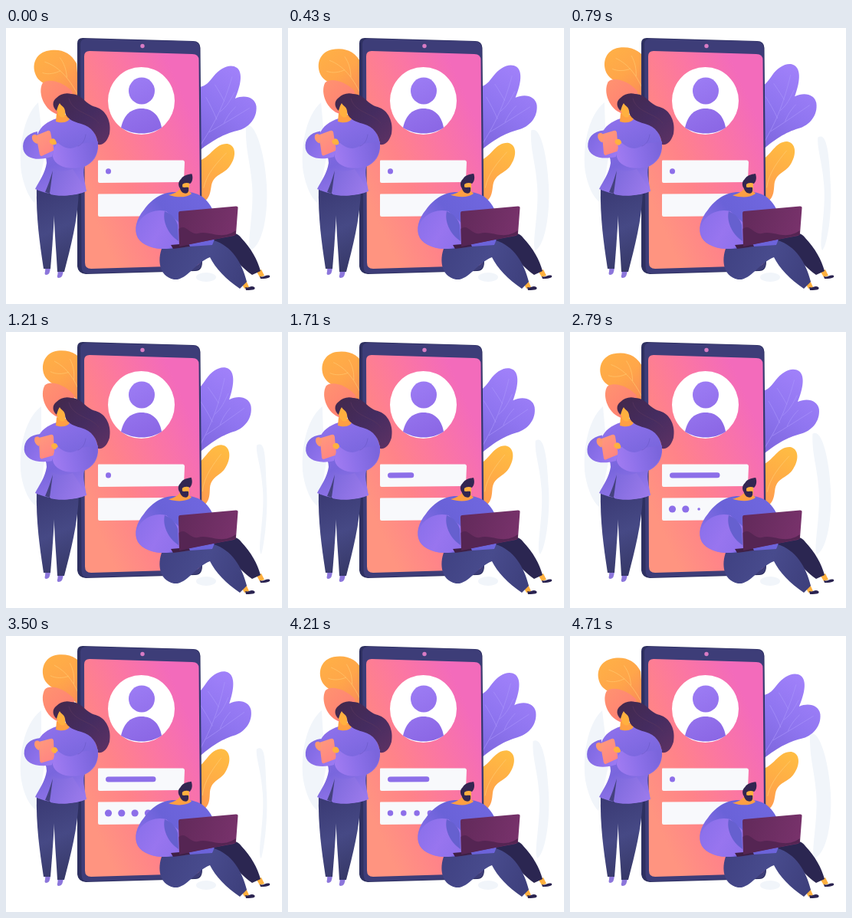
Write an HTML page with a canvas that moves like this. It is 360 by 360 pixels and loops after 4780 ms.

```html
<!DOCTYPE html>
<html lang="en">
<head>
<meta charset="utf-8">
<title>Sign in</title>
<style>
html, body { margin: 0; width: 100%; height: 100%; overflow: hidden; background: #fff; }
canvas { display: block; width: 100vmin; height: 100vmin; }
</style>
</head>
<body>
<canvas id="stage" width="360" height="360"></canvas>
<script>
const ctx = document.getElementById('stage').getContext('2d');
const LOOP = 4780, STEPS = 67, STEP = LOOP / STEPS;
const NAVY = '#3d3d78', HAIR = '#452c60', SKIN = '#ffb03f', VIOLET = '#8d6fe9';

function linear(x0, y0, x1, y1, ...colors) {
  const g = ctx.createLinearGradient(x0, y0, x1, y1);
  colors.forEach((c, i) => g.addColorStop(i / (colors.length - 1), c));
  return g;
}

function shape(d, fill) {
  ctx.fillStyle = fill;
  ctx.fill(new Path2D(d));
}

function line(d, color, width = 0.8) {
  ctx.strokeStyle = color;
  ctx.lineWidth = width;
  ctx.lineCap = 'round';
  ctx.stroke(new Path2D(d));
}

function oval(x, y, rx, ry, fill) {
  ctx.fillStyle = fill;
  ctx.beginPath();
  ctx.ellipse(x, y, rx, ry, 0, 0, Math.PI * 2);
  ctx.fill();
}

function turned(x, y, angle, draw) {
  ctx.save();
  ctx.translate(x, y);
  ctx.rotate(angle);
  ctx.translate(-x, -y);
  draw();
  ctx.restore();
}

// Eased progress from 0 to 1 between two times
function ease(t, from, to) {
  const p = Math.min(1, Math.max(0, (t - from) / (to - from)));
  return p * p * (3 - 2 * p);
}

function backdrop(sway) {
  const pale = '#f1f5fa', r = 323 - 7 * sway, l = 38 - 2 * sway;
  const top = 138 - 10 * sway;
  shape(`M${r - 3} ${top} C${r + 9} ${top - 8} 338 165 340 205 C342 240 336 282 ${r + 3} 290
    C${r - 3} 284 ${r + 8} 240 ${r + 5} 205 C${r + 3} 175 ${r - 4} 160 ${r - 3} ${top}Z`, pale);
  shape(`M${l + 6} 97 C22 115 16 160 20 188 C23 205 30 222 ${l + 1} 228 L50 170 L46 130Z`, pale);
  oval(261, 325, 13, 6, pale);
}

function leaves(sway) {
  turned(98, 125, -0.075 * sway, () => {
    shape('M98 94 L98 46 C91 30 77 24 60 27 C45 30 38 45 45 60 C52 73 72 74 98 94Z',
      linear(48, 28, 92, 90, '#ffb046', '#ffa64a', '#fb8c58'));
    line('M96 86 C86 63 74 48 57 41 M84 63 C84 53 82 45 77 37 M76 54 C69 57 60 58 53 55', '#ffc76d', 0.7);
  });
  turned(90, 118, -0.035 * sway, () =>
    shape('M92 105 L87 82 C74 68 55 64 49 71 C42 84 51 107 68 112Z',
      linear(48, 70, 82, 106, '#ff9270', '#ff7f74')));
  turned(245, 195, 0.037 * sway, () => {
    shape(`M246 164 L248 77 C257 75 260 70 266 62 C274 51 287 44 296 50 C304 56 302 72 295 90
      C308 84 321 88 323 99 C325 115 314 128 299 132 C282 137 268 145 246 164Z`,
      linear(252, 155, 310, 65, '#7d66dd', '#8f75f0', '#9f80f9'));
    line(`M250 156 C263 134 278 110 290 62 M263 135 C281 124 297 113 314 102
      M272 118 C267 107 262 98 257 90 M281 94 C276 85 272 79 268 73
      M282 122 C285 115 289 108 296 101 M276 108 C285 101 289 92 294 82`, '#a994fb', 0.65);
  });
  turned(250, 222, 0.056 * sway, () => {
    shape(`M248 222 L250 173 C265 166 269 149 285 149 C297 151 297 166 290 177
      C283 190 270 188 267 204 C266 213 266 220 259 226Z`,
      linear(252, 220, 290, 150, '#ff9c50', '#ffae45', '#ffbd43'));
    line('M257 208 C260 189 273 174 284 161', '#ffca70', 0.7);
  });
}

function phone() {
  shape(`M100 13 L244 17 Q253 17 253.5 26 L256 305 Q256 317 247 317 L104 321
    Q94 320 93 311 L93 20 Q93 13 100 13Z`, '#2e3061');
  shape(`M105 14 L244 17.5 Q252 17.5 252.5 26 L255.5 305 Q255 316 247 316 L106 320
    Q98.5 320 98.5 311 L97 21 Q97 14 105 14Z`, NAVY);
  shape(`M109 30 L243 34 Q251.5 34 251.5 42 L253.5 302 Q253.5 310 246 310 L111 314
    Q103 314 103 306 L102 37 Q102 30 109 30Z`,
    linear(100, 215, 257, 145, '#ff9480', '#ff8389', '#fb76a3', '#f36bbb'));
  oval(178, 23.5, 2.7, 2.7, '#d87bc4');

  oval(176.5, 95, 43.5, 44, '#fff');
  const tint = linear(160, 64, 194, 138, '#9d7df5', '#8a66e4');
  oval(177, 82, 17, 17.5, tint);
  shape('M150 130 C154 112 164 105 177 105 C190 105 200 113 203 130 C188 140 166 140 150 130Z', tint);

  shape('M121 172.5 L231 172.5 Q233 173 233 175 L232 199 Q232 201 230 201 L122 202 Q120 202 120 200 L120 174 Q120 172 121 172.5Z', '#f8f9fc');
  shape('M121 216.5 L230 216 L231 245 L122 246 Q120 246 120 244 L120 218 Q120 216 121 216.5Z', '#f8f9fc');
}

function entries(t) {
  const clear = ease(t, 4050, 4620);
  const end = 133.5 + 58.5 * ease(t, 1130, 2200) * (1 - clear);
  line(`M133.5 187 L${end} 186.7`, VIOLET, 7);
  for (let i = 0; i < 4; i++) {
    const start = 2200 + i * 240;
    const r = 4.6 * ease(t, start, start + 240) * (1 - clear);
    if (r > 0) oval(133.5 + i * 17.3, 231, r, r, VIOLET);
  }
}

function woman(sway) {
  const pants = linear(45, 215, 85, 310, '#3b3b75', '#464985', '#373969');
  shape('M51 313 L58 313 C57 318 57 322 52 322 C49 321 52 318 51 313Z', '#8c76db');
  shape('M67 316 L75 316 C74 321 74 326 68 326 C65 324 69 322 67 316Z', '#8c76db');
  shape('M40 207 L65 209 C63 245 61 279 58 314 L49 314 C44 281 39 247 40 207Z', pants);
  shape('M63 209 L95 211 C94 250 84 287 76 318 L67 318 C65 280 61 245 63 209Z', pants);

  shape(`M66 118 C54 122 45 128 41 139 C44 153 53 164 53 176 C51 190 43 200 38 210
    C55 218 85 222 105 213 C103 201 100 191 102 181 C113 176 121 167 120 151
    C118 135 107 122 90 119Z`, linear(55, 125, 99, 216, '#8c70ea', '#7966dd', '#9b7bee'));
  shape('M59 182 C66 187 75 188 87 184 L105 212 C85 220 70 220 58 217Z',
    linear(57, 185, 103, 210, '#7c69dc', '#9b7aeb'));
  shape('M61 186 L57 216 L51 214 C55 205 58 196 61 186Z', '#45427f');

  shape('M66 111 L82 114 C86 120 77 126 65 122Z', '#ff9f43');
  shape('M66 97 C70 93 78 96 78 103 L77 115 C73 119 68 115 67 109 L65 107Z', SKIN);
  shape(`M66 108 C60 103 60 95 66 91 C71 86 78 84 85 86 C101 87 102 99 117 103
    C131 107 138 123 135 138 C132 148 127 153 120 152 C119 139 112 129 98 125
    C86 122 77 117 77 108 C76 102 71 101 70 98 C68 101 67 104 66 108Z`,
    linear(74, 88, 130, 149, '#43294f', HAIR, '#5b3163'));
  line('M82 92 C87 111 110 110 121 124', '#59375f', 0.7);

  turned(57, 165, -0.07 * sway, () => {
    shape('M43 134 C29 136 22 144 23 156 C25 168 40 173 60 168 L65 151 L43 148Z',
      linear(23, 145, 65, 168, '#7e68e2', '#9f7cf4'));
    shape('M41 139 L56 134 Q59 133 60 136 L63 160 L47 166 Q45 167 44 164Z',
      linear(39, 135, 61, 166, '#ff9a7c', '#ff8383'));
    shape('M36 139 C39 136 44 138 43 144 L42 150 C38 149 34 144 36 139Z', '#ff9870');
    shape('M67 152 C67 145 62 142 58 147 C57 151 62 154 67 152Z', SKIN);
  });
  shape('M120 148 C121 166 111 178 96 182 C80 185 64 180 61 168 C61 158 65 150 68 150 C79 160 90 158 97 151Z',
    linear(62, 166, 115, 155, '#a07bf1', '#8c70e9', '#7b65dc'));
  line('M94 154 C101 151 103 145 104 139', '#6d5bc9', 0.7);
}

function man(sway) {
  shape('M327 318 L333 315 L337 323 L331 325Z', SKIN);
  shape('M331 324 C336 326 339 321 344 323 C345 325 343 327 332 327Z', '#2a2350');
  shape('M267 276 C283 264 300 264 307 274 C320 288 328 302 332 317 L321 322 C311 315 299 303 288 290Z', '#2b2651');
  shape('M306 331 L313 329 L317 338 L311 340Z', SKIN);
  shape('M312 338 C317 340 319 335 324 338 C326 341 323 342 313 342Z', '#2a2350');
  shape(`M206 281 C196 300 199 324 219 328 C235 330 246 307 266 299
    C273 313 287 328 305 340 L314 331 C308 306 294 284 271 277Z`,
    linear(204, 290, 306, 333, '#404283', '#484b8d', '#3e407d'));

  shape(`M222 214 C204 213 189 224 180 237 C170 249 166 263 172 274
    C180 287 205 291 225 286 L269 283 C280 260 274 234 256 220 C245 213 232 213 222 214Z`,
    linear(174, 276, 253, 219, '#8e70ec', '#6a62d8', '#6f66de'));
  shape('M209 239 C190 234 172 247 170 262 C170 280 187 289 209 288 L229 282 L226 254Z',
    linear(171, 251, 226, 284, '#8b70eb', '#9875ef', '#8e70ea'));
  shape('M207 239 C217 243 222 250 224 257 L225 278 C210 268 204 251 207 239Z', '#6660cf');

  turned(233, 216, 0.015 * sway, () => {
    shape('M212 218 C221 216 226 212 228 208 L238 212 L242 216 C234 222 222 221 212 218Z', '#ff9f43');
    shape('M228 201 C231 196 239 198 239 203 L239 211 C236 215 229 212 228 208Z', SKIN);
    shape('M226 208 C224 203 225 200 228 197 C231 192 236 191 242 190 C244 195 243 200 240 203 C236 201 232 202 230 204 L230 209Z', '#332651');
    shape('M226 204 C230 210 234 207 238 208 C239 215 236 217 231 215 C228 213 226 209 226 204Z', '#332651');
  });

  shape('M215 283 L238 281 L240 285 L218 288Z', '#3f2046');
  shape('M227 239 L300 232.5 Q303 232.5 302.5 235 L300 268 Q300 270 297 271 L228 284 Q226 285 226 282 L225 242 Q225 239 227 239Z',
    linear(226, 245, 299, 268, '#632a5b', '#78326b'));
  shape('M225.5 262 C235 255 239 270 250 268 C265 263 280 278 300 264 L299.5 270 L226 285Z', '#552553');
}

function render(now) {
  const t = Math.floor((now % LOOP) / STEP) * STEP;
  const sway = Math.cos(4 * Math.PI * t / LOOP);
  ctx.clearRect(0, 0, 360, 360);
  backdrop(sway);
  leaves(sway);
  phone();
  entries(t);
  woman(sway);
  man(sway);
}

let began;
function tick(now) {
  began ??= now;
  render(now - began);
  requestAnimationFrame(tick);
}
render(0);
requestAnimationFrame(tick);
</script>
</body>
</html>
```
